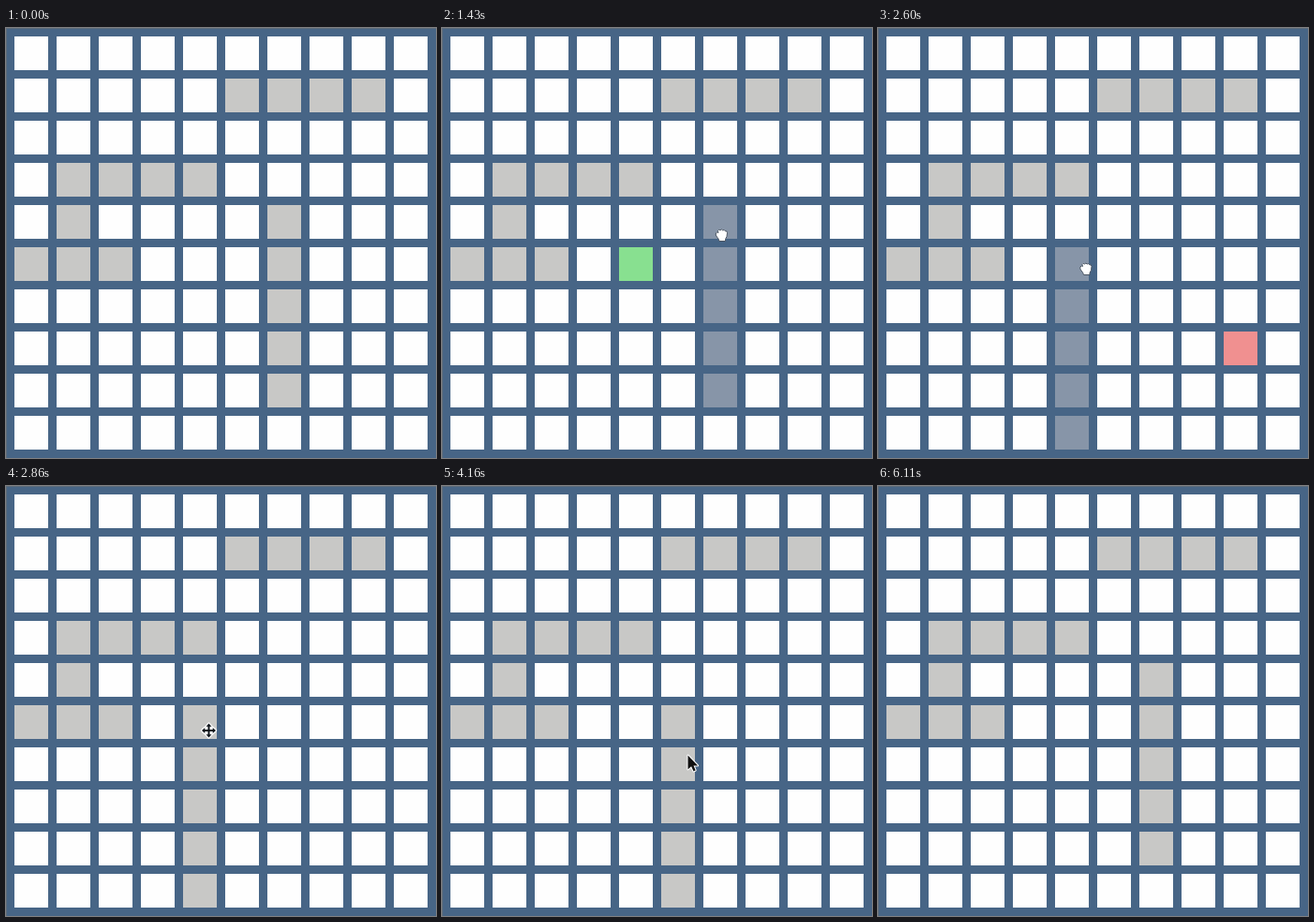
An HTML page with a canvas that plays this animation: 459 px wide and 459 px high, repeating every 6.37 s.

```html
<!DOCTYPE html>
<html lang="en">
<head>
<meta charset="utf-8">
<title>Drag blocks on a grid</title>
<style>
html, body { margin: 0; width: 100%; height: 100%; overflow: hidden; background: #476586; }
canvas { display: block; }
</style>
</head>
<body>
<canvas id="board" width="459" height="459"></canvas>
<script>
const ctx = document.getElementById('board').getContext('2d');
const LOOP = 6370, PITCH = 45, CELL = 36, GAP = 9;
const GRAY = '#c8c8c6', HELD = '#8795a8', GREEN = '#88e090', RED = '#f09090';

// Fixed blocks as [column, row, columns wide]
const walls = [[5, 1, 4], [1, 3, 4], [1, 4, 1], [0, 5, 3]];

// Cursor shapes: outline path, fill, stroke colour and width
const cursors = {
  move: [new Path2D('M0-7.5L3-4.2H1V-1H4.2V-3L7.5 0 4.2 3V1H1V4.2H3L0 7.5-3 4.2H-1V1H-4.2V3L-7.5 0-4.2-3V-1H-1V-4.2H-3Z'), '#10151b', '#fff', 2.4],
  arrow: [new Path2D('M0 0V15L3.6 11.8 6 17 8.2 16 6 11H10.6Z'), '#111', '#fff', 2],
  hand: [new Path2D('M-6-2Q-5-4-3.5-2.5L-4-4.5Q-3-6.5-1.5-5Q0-7 1.2-5Q3-6.3 3.8-4.2Q5.8-4.8 6 -2.5Q6 2 4 4.5V6.5H-2.5Q-3 4-5 2Q-7 0-6-2Z'), '#fff', '#4a5563', 1]
};

// Long block: [start ms, column, row, held]
const block = [
  [0, 6, 4], [1300, 6, 4, true], [1950, 4, 5], [2600, 4, 5, true], [2860, 4, 5],
  [3770, 4, 5, true], [4160, 5, 5], [4680, 5, 5, true], [5460, 6, 4]
];

// Highlighted drop cell: [start ms, column, row, colour]
const target = [
  [0], [1430, 4, 5, GREEN], [1950], [2600, 8, 7, RED], [2860],
  [3770, 5, 6, GREEN], [4160], [4810, 6, 6, GREEN], [5460]
];

// Pointer: [start ms, shape, x, y]
const pointer = [
  [0], [260, 'move', 212, 321.5], [780, 'move', 236, 306], [910, 'move', 278, 268],
  [1040, 'move', 315, 236], [1170, 'move', 299, 221], [1300], [1430, 'hand', 298.5, 221],
  [1950, 'move', 218.5, 246.5], [2210, 'move', 222, 256.5], [2600, 'hand', 222, 257],
  [2860, 'move', 216.5, 261], [3120, 'move', 227, 279], [3510, 'move', 221, 289],
  [3770, 'hand', 221, 290], [4160, 'arrow', 262.5, 287.5], [4550, 'move', 268, 338],
  [4680], [5200, 'hand', 268, 339], [5460, 'move', 297, 297], [6110]
];

const at = (track, t) => track.findLast(step => step[0] <= t);

function cell(col, row, color) {
  ctx.fillStyle = color;
  ctx.fillRect(GAP + col * PITCH, GAP + row * PITCH, CELL, CELL);
}

function drawCursor(shape, x, y) {
  const [path, fill, stroke, width] = cursors[shape];
  ctx.save();
  ctx.translate(x, y);
  ctx.lineJoin = 'round';
  ctx.lineWidth = width;
  ctx.strokeStyle = stroke;
  ctx.fillStyle = fill;
  if (shape === 'hand') {
    ctx.fill(path);
    ctx.stroke(path);
  } else {
    ctx.stroke(path);
    ctx.fill(path);
  }
  ctx.restore();
}

function draw(now) {
  const t = now % LOOP;
  ctx.fillStyle = '#476586';
  ctx.fillRect(0, 0, 459, 459);
  ctx.fillStyle = '#5c6b7a';
  ctx.fillRect(0, 0, 459, 1);
  ctx.fillRect(0, 0, 1, 459);

  for (let i = 0; i < 100; i++) cell(i % 10, Math.floor(i / 10), '#fefefe');
  for (const [col, row, wide] of walls) {
    for (let i = 0; i < wide; i++) cell(col + i, row, GRAY);
  }

  const [, col, row, held] = at(block, t);
  for (let i = 0; i < 5; i++) cell(col, row + i, held ? HELD : GRAY);

  const [, dropCol, dropRow, color] = at(target, t);
  if (color) cell(dropCol, dropRow, color);

  const [, shape, x, y] = at(pointer, t);
  if (shape) drawCursor(shape, x, y);
}

const start = performance.now();
function tick() {
  draw(performance.now() - start);
  requestAnimationFrame(tick);
}
tick();
</script>
</body>
</html>
```
